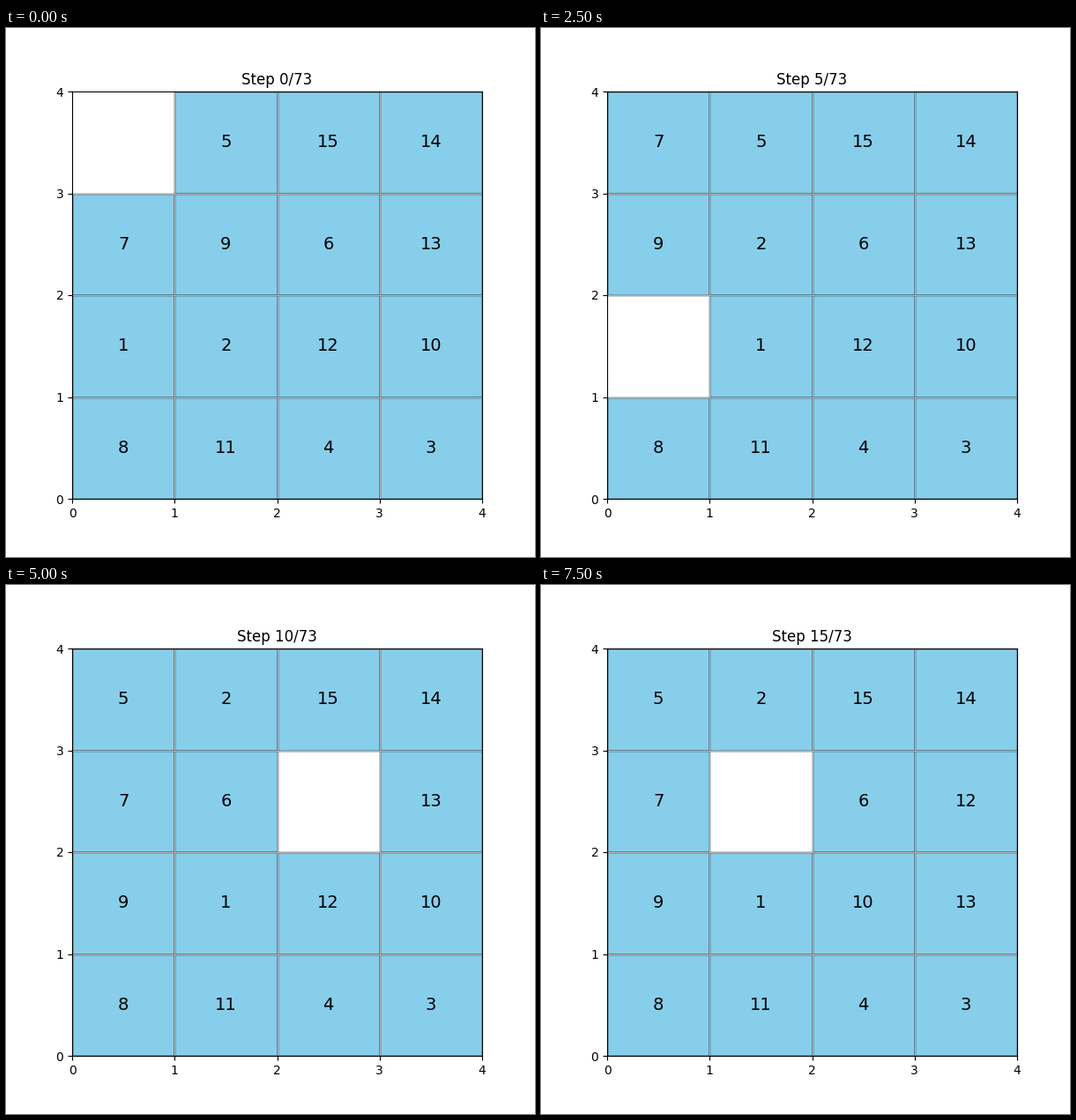
Animation of 600x600 px, one loop 8 s. Source, as a matplotlib script:

```python
import matplotlib.pyplot as plt
from matplotlib.animation import FuncAnimation

SIZE = 4
TOTAL = 73
START = [
    [0, 5, 15, 14],
    [7, 9, 6, 13],
    [1, 2, 12, 10],
    [8, 11, 4, 3],
]
# Direction the empty cell travels at each step; "." is a pause
MOVES = "..DRDLUURDRDRULL"
SHIFT = {".": (0, 0), "U": (-1, 0), "D": (1, 0), "L": (0, -1), "R": (0, 1)}


def board_at(step):
    board = [row[:] for row in START]
    r, c = 0, 0
    for move in MOVES[:step + 1]:
        dr, dc = SHIFT[move]
        nr, nc = r + dr, c + dc
        board[r][c], board[nr][nc] = board[nr][nc], board[r][c]
        r, c = nr, nc
    return board


def draw_tile(row, col, value):
    x, y = col, SIZE - 1 - row
    ax.add_patch(plt.Rectangle((x, y), 1, 1, facecolor="skyblue",
                               edgecolor="black"))
    ax.text(x + 0.5, y + 0.5, str(value), fontsize=14,
            ha="center", va="center")


def draw(step):
    ax.clear()
    ax.set_xlim(0, SIZE)
    ax.set_ylim(0, SIZE)
    ax.set_xticks(range(SIZE + 1))
    ax.set_yticks(range(SIZE + 1))
    ax.grid(True)
    ax.set_title(f"Step {step}/{TOTAL}")
    for row, values in enumerate(board_at(step)):
        for col, value in enumerate(values):
            if value:
                draw_tile(row, col, value)
    return []


fig, ax = plt.subplots(figsize=(6, 6), dpi=100)
anim = FuncAnimation(fig, draw, frames=len(MOVES), interval=500,
                     init_func=lambda: draw(0), repeat=True)
plt.show()
```
